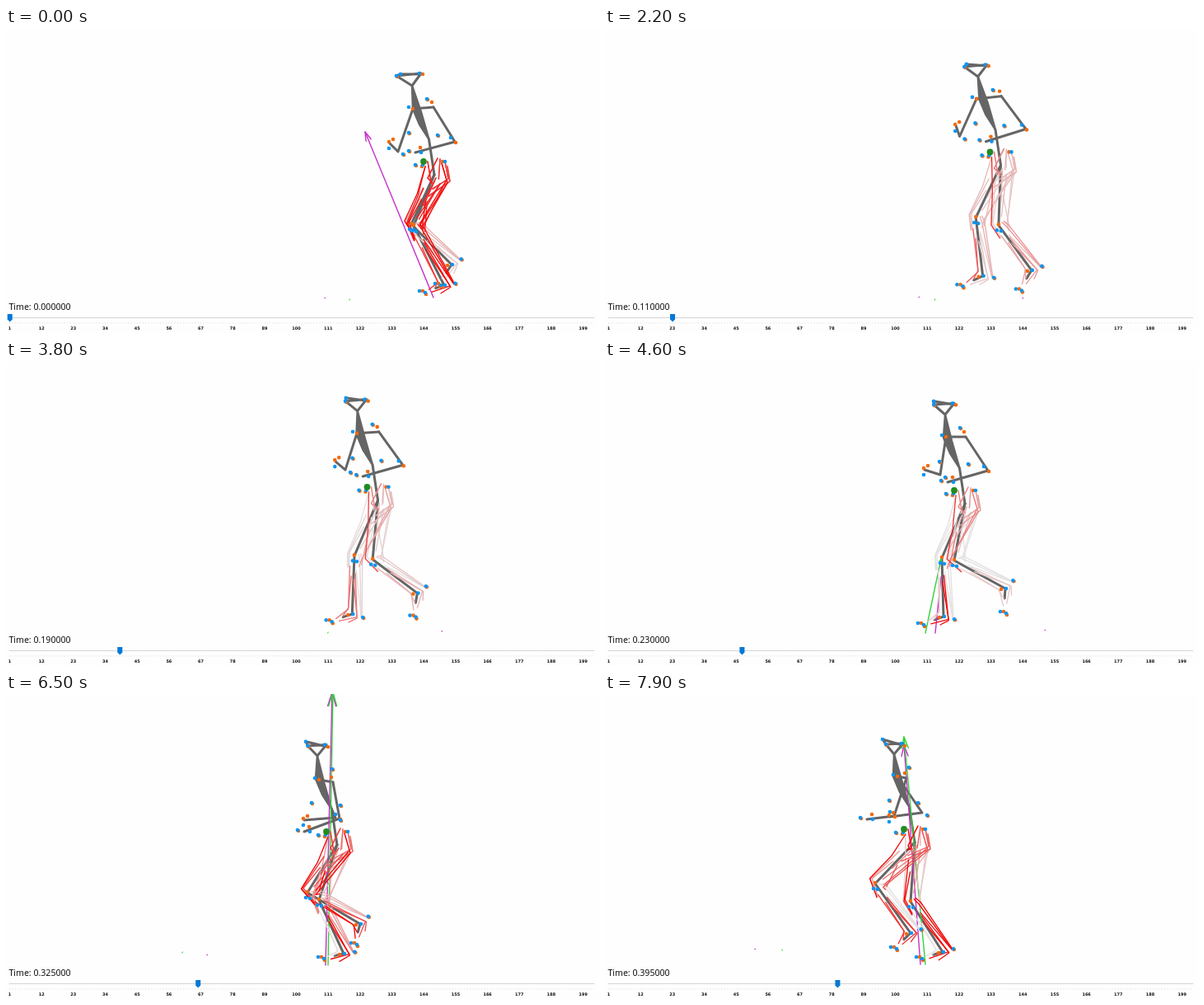
An HTML page for the animation above (8000 ms loop, 720 px wide and 370 px high).

```html
<!DOCTYPE html>
<html lang="en">
<head>
<meta charset="utf-8">
<title>Gait playback</title>
<style>
  html, body { margin: 0; width: 100%; height: 100%; overflow: hidden; background: #fefefe; }
  svg { display: block; width: 720px; height: 370px; }
  .clock { font: 10.6px "Open Sans", "Noto Sans", sans-serif; }
  .label { font: bold 5px "DejaVu Sans", sans-serif; text-anchor: middle; }
</style>
</head>
<body>
<svg viewBox="0 0 720 370" fill="none" stroke-linecap="round" stroke-linejoin="round">
  <g id="scene"></g>
  <text class="clock" id="clock" x="3.5" y="342" fill="#000"></text>
  <g id="ruler"></g>
  <path id="thumb" d="M-3 347H3V353.5L0 356.5L-3 353.5Z" fill="#0078d7"/>
</svg>
<script>
const byId = id => document.getElementById(id);
const STEP_MS = 100, STEPS = 80, PX_PER_STEP = 3.516;
const BONE = '#656565', BLUE = '#0c95f3', ORANGE = '#f2690f', MAGENTA = '#c530c8', GREEN = '#30d33a';

// Tracks hold x, y pairs, one pair for each key step.
const KEYS = [0, 14, 30, 46, 54, 65, 79];
const body = {
  pelvis:       [507,162, 482,153, 453,150, 424,157, 409,162, 389,167, 363,164],
  neck:         [493,70, 466,62, 440,58, 413,65, 398,70, 378,75, 351,73],
  nearShoulder: [519,96, 495,86, 467,82, 438,92, 422,100, 397,107, 366,102],
  nearElbow:    [545,138, 524,126, 497,122, 465,133, 443,143, 405,151, 351,148],
  nearHand:     [497,151, 475,142, 449,136, 416,147, 396,158, 362,167, 318,152],
  farShoulder:  [494,98, 465,89, 438,85, 414,92, 400,97, 380,104, 355,100],
  farElbow:     [476,150, 445,137, 419,129, 407,138, 403,146, 400,150, 385,144],
  farHand:      [466,140, 440,126, 413,116, 388,132, 377,143, 362,153, 346,149]
};
const leadLeg = {
  knee:  [492,238, 464,228, 437,234, 409,239, 396,245, 380,250, 371,252],
  ankle: [541,287, 487,297, 435,304, 411,310, 410,314, 410,315, 410,313],
  toe:   [525,312, 462,314, 407,313, 384,320, 382,321, 383,321, 382,321]
};
const trailLeg = {
  knee:  [495,240, 488,239, 464,240, 424,242, 402,246, 366,241, 328,230],
  ankle: [532,312, 524,300, 510,288, 486,276, 465,275, 430,279, 371,290],
  toe:   [506,321, 503,321, 501,315, 484,306, 463,303, 423,304, 351,309]
};

// Muscle points: P = px from hip; T, S, F = share along thigh, shank or foot and px to its front.
const muscles = {
  rectus:   [['P',-11,-10, 'T',.45,9, 'T',1,9, 'S',.2,8]],
  vasti:    [['T',.3,6, 'T',1,8, 'S',.2,7], ['T',.5,3, 'T',.97,7, 'S',.18,6]],
  psoas:    [['P',4,-20, 'P',-8,4, 'T',.15,-2], ['P',-8,-16, 'P',-4,8, 'T',.18,0]],
  gluteal:  [['P',13,-16, 'P',17,5, 'T',.25,-5], ['P',7,-19, 'T',.04,-7], ['P',16,-10, 'P',19,8, 'T',.4,-4]],
  hams:     [['P',9,-14, 'P',16,10, 'T',.95,-10, 'S',.18,-6], ['P',14,8, 'S',.1,-8], ['T',.5,-4, 'S',.15,-9]],
  adductor: [['P',2,4, 'T',.6,-2], ['P',7,11, 'T',.85,-3]],
  gastroc:  [['T',.93,-6, 'S',.1,-10, 'S',1.05,-12], ['T',.95,-4, 'S',.12,-7, 'S',1.04,-11]],
  soleus:   [['S',.25,-3, 'S',1.05,-11]],
  tibial:   [['S',.18,5, 'S',.9,5, 'F',.4,1], ['S',.35,3, 'S',.92,5, 'F',.7,1]],
  peroneal: [['S',.3,-2, 'S',1.07,-6, 'F',.25,-8], ['S',.4,0, 'S',1.05,-6, 'F',.6,-3]]
};
const leadActivity = {
  rectus: [9,3,0,0,7,3,1], vasti: [2,2,1,0,2,4,9], psoas: [8,3,1,0,6,4,3], gluteal: [7,3,1,3,4,3,2],
  hams: [9,2,1,4,4,2,1], adductor: [8,2,0,2,5,2,3], gastroc: [2,3,1,0,1,3,9], soleus: [1,1,0,0,2,4,9],
  tibial: [1,3,8,1,0,0,0], peroneal: [1,2,0,9,9,9,9]
};
const trailActivity = {
  rectus: [8,9,6,7,8,9,9], vasti: [9,1,0,0,0,7,3], psoas: [7,4,4,4,6,7,9], gluteal: [6,1,0,0,1,5,6],
  hams: [8,1,1,0,3,9,6], adductor: [8,2,1,1,2,6,4], gastroc: [9,4,2,0,0,2,0], soleus: [9,3,0,0,0,1,0],
  tibial: [7,2,3,1,2,9,7], peroneal: [9,3,3,1,1,6,7]
};

const STANCE = [40, 46, 54, 65, 79];
const forces = [
  { color: MAGENTA, keys: [0, 14, 20], base: [519,327, 505,327, 503,328], tip: [436,126, 507,270, 503,328] },
  { color: MAGENTA, keys: STANCE, base: [403,330, 401,330, 394,329, 388,329, 383,328],
    tip: [403,330, 408,262, 411,122, 396,-2, 363,62] },
  { color: GREEN, keys: STANCE, base: [389,330, 389,330, 392,329, 391,329, 389,328],
    tip: [389,330, 408,240, 415,110, 397,-2, 363,52] }
];
const specks = [
  { color: MAGENTA, keys: [21, 30, 46, 54, 62], at: [504,328, 530,330, 534,327, 592,330, 640,331] },
  { color: GREEN, keys: [0, 14, 30, 39], at: [417,330, 405,329, 396,331, 390,330] },
  { color: MAGENTA, keys: [0, 14, 26], at: [387,328, 383,327, 380,327] },
  { color: GREEN, keys: [50, 65, 79], at: [216,313, 214,314, 215,311] },
  { color: MAGENTA, keys: [60, 65, 79], at: [258,319, 244,317, 182,310] }
];

const add = (p, x, y) => [p[0] + x, p[1] + y];
const mix = (a, b, u) => a.map((v, i) => v + (b[i] - v) * u);

function locate(keys, step) {
  let i = 0;
  while (i < keys.length - 2 && step >= keys[i + 1]) i++;
  return [i, (step - keys[i]) / (keys[i + 1] - keys[i])];
}

// Smooth curve through unevenly spaced keys.
function sample(track, keys, step) {
  const [i, u] = locate(keys, step), last = keys.length - 1, span = keys[i + 1] - keys[i];
  return [0, 1].map(axis => {
    const value = k => track[2 * k + axis];
    const slope = k => {
      const a = Math.max(0, k - 1), b = Math.min(last, k + 1);
      return (value(b) - value(a)) / (keys[b] - keys[a]) * span;
    };
    const a = value(i), b = value(i + 1), m = slope(i), n = slope(i + 1);
    return a + u * (m + u * (3 * (b - a) - 2 * m - n + u * (2 * (a - b) + m + n)));
  });
}

const pose = (tracks, step) =>
  Object.fromEntries(Object.entries(tracks).map(([name, t]) => [name, sample(t, KEYS, step)]));

const trace = pts => 'M' + pts.map(p => p.map(v => v.toFixed(1)).join(' ')).join('L');
const line = (pts, color, width) => `<path d="${trace(pts)}" stroke="${color}" stroke-width="${width}"/>`;
const bone = (...pts) => line(pts, BONE, 3);
const dot = (p, color, r = 2.3) =>
  `<circle cx="${p[0].toFixed(1)}" cy="${p[1].toFixed(1)}" r="${r}" fill="${color}"/>`;
const blue = (p, x = 0, y = 0) => dot(add(p, x, y), BLUE);
const orange = (p, x = 0, y = 0) => dot(add(p, x, y), ORANGE);
const pair = (p, x, y) => orange(p, x + 1, y + 1) + blue(p, x, y);

function along([a, b], share, front) {
  const dx = b[0] - a[0], dy = b[1] - a[1], len = Math.hypot(dx, dy);
  return [a[0] + dx * share - dy / len * front, a[1] + dy * share + dx / len * front];
}

function legBones(hip, leg) {
  return bone(hip, leg.knee, leg.ankle, mix(leg.ankle, leg.toe, .4));
}

function legMuscles(hip, leg, activity, step) {
  const parts = { T: [hip, leg.knee], S: [leg.knee, leg.ankle], F: [leg.ankle, leg.toe] };
  const [i, u] = locate(KEYS, step);
  return Object.entries(muscles).map(([name, paths]) => {
    const [a, b] = activity[name].slice(i, i + 2);
    const level = (a + (b - a) * u) / 9;
    const color = `rgb(${mix([228, 224, 224], [242, 8, 8], level).map(Math.round)})`;
    return { level, svg: paths.map(path => {
      const pts = [];
      for (let k = 0; k < path.length; k += 3) {
        const [part, x, y] = path.slice(k, k + 3);
        pts.push(part === 'P' ? add(hip, x, y) : along(parts[part], x, y));
      }
      return line(pts, color, 1.35);
    }).join('') };
  });
}

function legMarkers({ knee, ankle, toe }) {
  const heel = along([knee, ankle], 1.05, -13);
  return orange(knee, 0, -1) + blue(knee, -2, 6) + blue(knee, 3, 7) +
    orange(ankle, -5, 1) + blue(ankle, 1, 0) + pair(heel, 0, 0) +
    blue(toe, -4, -2) + orange(toe, 0, -2) + orange(toe, 4, 2) + blue(toe, 3, 0);
}

function head(neck, p) {
  const a = add(neck, -19 + 9 * p, -12), b = add(neck, -14, -14 - 4 * p);
  const c = add(neck, 11, -15 + 2 * p), d = add(neck, 13, -14 + 4 * p);
  return {
    bones: bone(a, c, neck, a, b, d),
    markers: pair(a, 0, 0) + blue(b) + blue(c, -2, 0) + orange(d)
  };
}

function torso({ neck, pelvis, farShoulder, nearShoulder }, waist, hip) {
  const wedge = [neck, add(pelvis, -13, -64), add(pelvis, -5, -45), waist, add(pelvis, -3, -60)];
  return `<path d="${trace(wedge)}Z" fill="${BONE}" stroke="${BONE}" stroke-width="2.5"/>` +
    bone(farShoulder, nearShoulder) + bone(waist, hip);
}

function arrow({ color, keys, base, tip }, step) {
  if (step < keys[0] || step >= keys.at(-1) + 1) return '';
  const from = sample(base, keys, step), to = sample(tip, keys, step);
  const size = Math.hypot(to[0] - from[0], to[1] - from[1]);
  if (size < 2) return '';
  const barb = side => along([from, to], .95, side * size * .015);
  return line([from, to], color, 1.4) + (size > 90 ? line([barb(1), to, barb(-1)], color, 1.4) : '');
}

function speck({ color, keys, at }, step) {
  if (step < keys[0] || step > keys.at(-1)) return '';
  const p = sample(at, keys, step);
  return line([p, add(p, .4, -1)], color, 1.1);
}

function upperMarkers(b) {
  return pair(b.neck, 18, 16) + orange(b.nearShoulder, -2, -6) +
    blue(b.farShoulder, -5, -2) + orange(b.farShoulder, 0, 0) +
    pair(b.pelvis, -18, -35) + pair(b.pelvis, 17, -32) +
    blue(b.nearElbow, -5, -5) + orange(b.nearElbow, 1, 1) +
    orange(b.farHand, -1, -2) + orange(b.farHand, 4, -5) + blue(b.farHand, -1, 6) +
    pair(b.farElbow, 6, 3) + pair(b.nearHand, -8, -2) +
    orange(b.nearHand, 6, -6) + blue(b.nearHand, 7, 0) +
    pair(b.pelvis, -10, 4) + orange(b.pelvis, -2, 6) + blue(b.pelvis, -1, 4) +
    orange(b.pelvis, 23, 0) + blue(b.pelvis, 26, 0);
}

function draw(step) {
  const b = pose(body, step), lead = pose(leadLeg, step), trail = pose(trailLeg, step);
  const hip = add(b.pelvis, 13, 16), waist = add(b.pelvis, 6.5, -27);
  const skull = head(b.neck, step / (STEPS - 1));
  const fibres = [...legMuscles(hip, lead, leadActivity, step), ...legMuscles(hip, trail, trailActivity, step)]
    .sort((m, n) => m.level - n.level).map(m => m.svg).join('');
  byId('scene').innerHTML =
    specks.map(s => speck(s, step)).join('') +
    skull.bones + torso(b, waist, hip) +
    bone(b.farShoulder, b.farElbow, b.farHand) + bone(b.nearShoulder, b.nearElbow, b.nearHand) +
    legBones(hip, trail) + legBones(hip, lead) +
    forces.map(f => arrow(f, step)).join('') + fibres +
    skull.markers + upperMarkers(b) + legMarkers(trail) + legMarkers(lead) +
    dot(b.pelvis, '#228b22', 3.9);
  byId('clock').textContent = 'Time: ' + (step * .005).toFixed(6);
  byId('thumb').setAttribute('transform', `translate(${4.7 + step * PX_PER_STEP})`);
}

function buildRuler() {
  let svg = '<path d="M4 351.5H714" stroke="#d4d4d4"/>';
  for (let n = 0; n <= 201; n++) {
    const x = 4.5 + n * PX_PER_STEP;
    svg += `<path d="M${x} 357V358.5" stroke="#dedede" stroke-width=".8" stroke-linecap="butt"/>`;
    if (n % 11 === 0) svg += `<text class="label" x="${x}" y="366" fill="#111">${n + 1}</text>`;
  }
  byId('ruler').innerHTML = svg;
}

let shown = -1;
function tick() {
  const step = Math.floor(performance.now() / STEP_MS) % STEPS;
  if (step !== shown) draw(shown = step);
  requestAnimationFrame(tick);
}
buildRuler();
tick();
</script>
</body>
</html>
```
